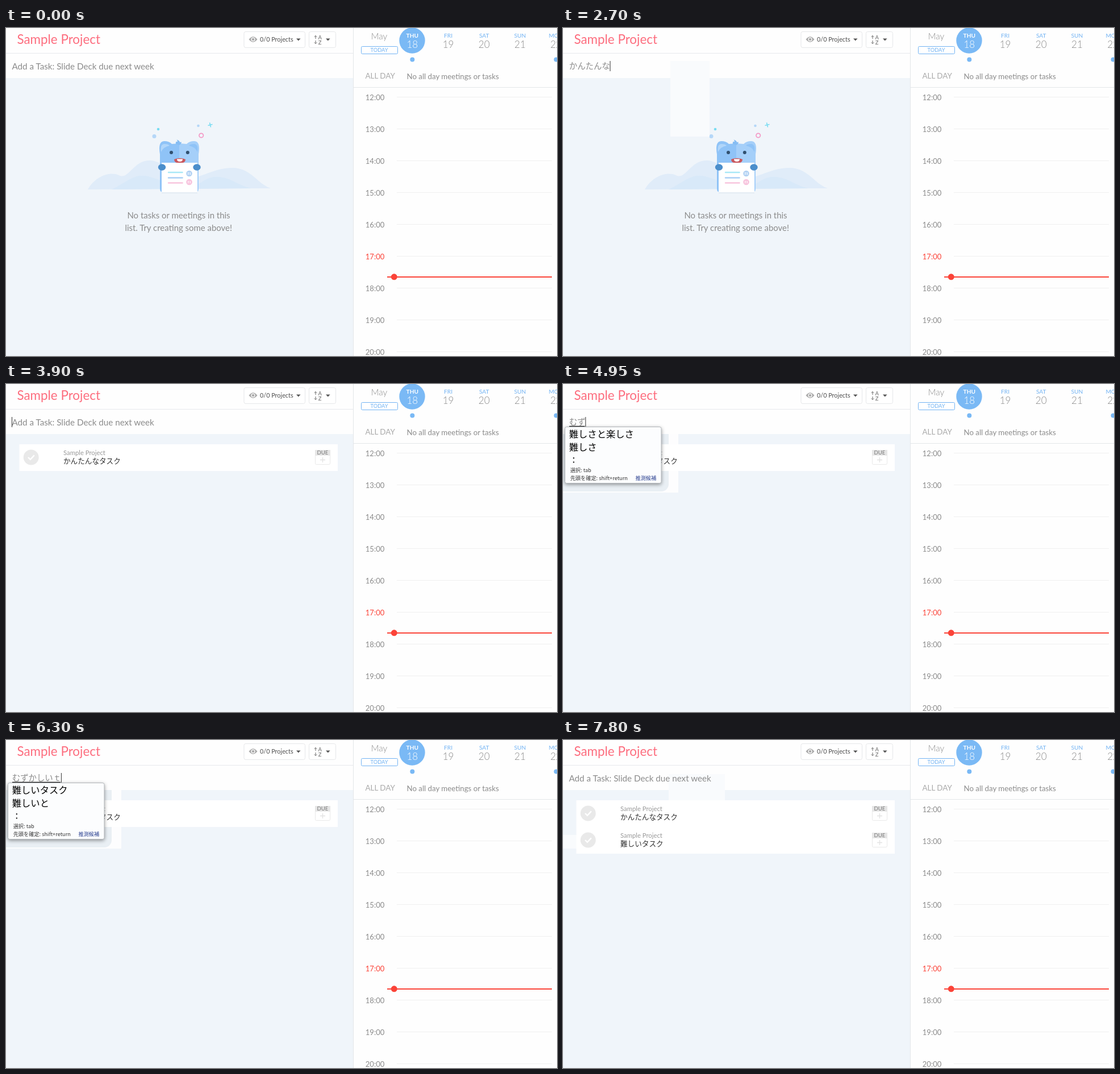
Animation, 970 px wide and 577 px high, one loop 8 s. Source, as an HTML page:

```html
<!DOCTYPE html>
<html lang="en">
<head>
<meta charset="utf-8">
<title>Task planner</title>
<style>
  html, body { margin: 0; width: 100%; height: 100%; overflow: hidden; background: #fefefe; }
  svg { display: block; width: 970px; height: 577px; }
  text { font-family: Lato, "Noto Sans CJK JP", "Noto Sans CJK", sans-serif; fill: #8b8b8b; white-space: pre; }
  .jp { font-family: "Noto Sans CJK JP", "Noto Sans CJK", sans-serif; }
  .mid { text-anchor: middle; }
  .title { font-size: 22.4px; fill: #fd6e7f; }
  .body { font-size: 15.2px; }
  .note { font-size: 14.95px; }
  .typed { font-size: 14.4px; }
  .btn { fill: #fff; stroke: #e6e7e9; }
  .day { font-size: 10.2px; fill: #72b3f3; }
  .date { font-size: 17px; font-weight: 300; fill: #888; }
  .hour { font-size: 13px; }
  .cand { font-size: 16.3px; fill: #000; }
  .hint { font-size: 9.2px; fill: #333; }
  .name { font-size: 12.6px; fill: #333; }
  .pop { filter: drop-shadow(0 2px 3px rgba(0, 0, 0, .4)); }
</style>
</head>
<body>
<svg viewBox="0 0 970 577">
  <defs>
    <clipPath id="below"><path d="M0 88H611V577H0z"/></clipPath>
    <g id="row">
      <path d="M23.5 106h560.5v47H23.5z" fill="#fff"/>
      <circle cx="44.2" cy="129" r="13.5" fill="#e9e9e9"/>
      <path d="M39 129l3.8 3.8 7-7.4" fill="none" stroke="#fff" stroke-width="2.4"/>
      <text x="101" y="125" font-size="11.3" style="fill:#999">Sample Project</text>
      <rect x="544.5" y="116.5" width="26" height="25" rx="2" fill="#fff" stroke="#e9e9e9"/>
      <path d="M544 116h27v10h-27z" fill="#e6e6e6"/>
      <text class="mid" x="557.3" y="124.4" font-size="9.5" style="fill:#777">DUE</text>
      <path d="M553 133.5h9M557.5 129v9" stroke="#e2e2e2" stroke-width="1.3"/>
    </g>
  </defs>

  <path d="M0 0H970V577H0z" fill="#fefefe"/>
  <path d="M0 88H611V577H0z" fill="#f0f5fa"/>
  <path d="M0 44.5H611" stroke="#e7e9ec"/>
  <text class="title" x="19.5" y="28">Sample Project</text>

  <rect class="btn" x="419" y="6.5" width="107.5" height="28" rx="3"/>
  <path d="M427.5 20q7.5-9.5 15 0q-7.5 9.5-15 0z" fill="#aaa"/>
  <circle cx="435" cy="20" r="2.9" fill="#aaa" stroke="#fff" stroke-width="1.3"/>
  <text x="447" y="24" font-size="10.8" font-weight="500" style="fill:#5c5c5c">0/0 Projects</text>
  <rect class="btn" x="533.5" y="6.5" width="47" height="28" rx="3"/>
  <path d="M511 18.5h7.6l-3.8 4zM563 18.5h7.6l-3.8 4z" fill="#555"/>
  <path d="M545 19v-5.5m-2.2 2.2l2.2-2.2 2.2 2.2M545 22v5.5m-2.2-2.2l2.2 2.2 2.2-2.2" fill="none" stroke="#666"/>
  <text x="549.5" y="19.7" font-size="9.5" style="fill:#666">A</text>
  <text x="549.8" y="28.5" font-size="9.5" style="fill:#666">Z</text>

  <g id="empty">
    <path d="M144 284C158 260 184 251 201 260C216 265 226 233 252 233C281 233 292 264 320 266C352 260 368 246 400 246C432 247 442 274 466 282z" fill="#e0ecf9"/>
    <path d="M186 284C212 272 226 255 250 261C270 266 285 274 305 283zM318 283C345 276 352 259 375 262C398 264 408 277 432 282z" fill="#d8e9f9"/>
    <g fill="#b5d7f8">
      <circle cx="261" cy="190.5" r="3.5"/>
      <circle cx="338.5" cy="172" r="2.3"/>
      <circle cx="268" cy="178" r="2.3" fill="#79dcf2"/>
    </g>
    <circle cx="343.7" cy="189" r="3.7" fill="none" stroke="#f497c5" stroke-width="1.7"/>
    <path d="M355.5 171.5l8-2M358.5 166.500l2 8" stroke="#79dcf2" stroke-width="1.6"/>
    <path d="M271 283V222Q267 199 279 199Q287 199 292 204L305 203V289H277Q271 289 271 283z" fill="#8fc3f7"/>
    <path d="M339 283V222Q343 199 331 199Q323 199 318 204L305 203V289H333Q339 289 339 283z" fill="#a5cff9"/>
    <path d="M273 218Q271 204 279 204Q286 204 288 207Q277 209 273 218z" fill="#b1d6fa"/>
    <path d="M337 218Q339 204 331 204Q324 204 322 207Q333 209 337 218z" fill="#8fc3f7"/>
    <path d="M299 204Q298 199 302 200Q302 198 300.5 196.5Q306 198 306 201Q308 200 309 201Q308 205 305 206z" fill="#86bdf3"/>
    <g fill="#31506f"><circle cx="291" cy="219" r="3"/><circle cx="319.8" cy="219" r="3"/></g>
    <path d="M296 231Q306 227 316 231Q316 238 306 238Q296 238 296 231z" fill="#c9575d"/>
    <path d="M301 230.5H311Q311 235 306 235Q301 235 301 230.5z" fill="#fff"/>
    <path d="M274 288h63v3h-63z" fill="#e3ebf3"/>
    <path d="M274 237h63v52h-63z" fill="#fff"/>
    <g stroke-width="2.5" stroke-linecap="round">
      <path d="M286 254h24.5" stroke="#a9e8f7"/>
      <path d="M286 263.5h24.5" stroke="#a9cff5"/>
      <path d="M286 272.5h24.5" stroke="#f8c5de"/>
    </g>
    <circle cx="322.5" cy="256" r="5.3" fill="#b3d2f3"/>
    <circle cx="322.5" cy="271" r="5.3" fill="#f7c3dd"/>
    <g class="mid" font-size="6" font-weight="700">
      <text x="322.5" y="258.2" style="fill:#fff">31</text>
      <text x="322.5" y="273.2" style="fill:#fff">31</text>
    </g>
    <g fill="#4b8ecb"><ellipse cx="274.5" cy="245" rx="6.7" ry="5.7"/><ellipse cx="336" cy="245" rx="6.7" ry="5.7"/></g>
    <text class="note mid" x="304" y="335">No tasks or meetings in this</text>
    <text class="note mid" x="303.7" y="357">list. Try creating some above!</text>
  </g>

  <path id="haze" fill="#f9fbfd"/>
  <rect id="halo" x="-14" y="66" height="123" rx="13" fill="#e9eff4" clip-path="url(#below)"/>
  <g id="task1"><use href="#row"/><text class="jp name" x="101" y="140.3">かんたんなタスク</text></g>
  <g id="task2" transform="translate(0 47)"><use href="#row"/><text class="jp name" x="101" y="140.3">難しいタスク</text></g>

  <text class="body" id="hintText" x="10.5" y="72.5">Add a Task: Slide Deck due next week</text>
  <text class="jp typed" id="typed" x="10.8" y="72"></text>
  <path id="line" stroke="#222" stroke-width="1.3"/>
  <path id="caret" stroke="#333"/>

  <g id="popup">
    <rect class="pop" id="frame" x="3.5" y="75.5" height="99" rx="3" fill="#fcfdfe" stroke="#b2b6ba"/>
    <text class="jp cand" id="first" x="10.8" y="93.7"></text>
    <text class="jp cand" id="second" x="10.8" y="117"></text>
    <path d="M17.8 129.3h2v2h-2zM17.8 136.5h2v2h-2z"/>
    <text class="jp hint" x="12.7" y="155.3">選択: tab</text>
    <text class="jp hint" x="12.7" y="169">先頭を確定: shift+return</text>
    <text class="jp hint" x="127.5" y="169" style="fill:#2b4191">推測候補</text>
  </g>

  <g id="calendar">
    <path d="M611.5 0V577M612 104.5H970" stroke="#e3e6e9"/>
    <text class="mid" x="657" y="20" font-size="15.3" font-weight="300">May</text>
    <rect x="625.5" y="32.5" width="64" height="13" rx="2" fill="#fff" stroke="#72b3f3"/>
    <text class="mid" x="657" y="42" font-size="9.3" style="fill:#72b3f3">TODAY</text>
    <g fill="#7ab9f5">
      <circle cx="715" cy="22" r="22.7"/>
      <circle cx="715.3" cy="55.5" r="4"/>
      <circle cx="968.5" cy="55.5" r="4"/>
    </g>
    <text x="632.5" y="88.8" font-size="13.4" style="fill:#aaa">ALL DAY</text>
    <text x="705.5" y="89.7" font-size="13.25">No all day meetings or tasks</text>
  </g>
  <g id="now" fill="#fb4338">
    <path d="M671 437H961V439H671z"/>
    <circle cx="683.3" cy="437.8" r="5.5"/>
  </g>
</svg>
<script>
const $ = id => document.getElementById(id);
const show = (id, on) => $(id).setAttribute('display', on ? 'inline' : 'none');
const set = (id, name, value) => $(id).setAttribute(name, value);
const box = (l, t, r, b) => `M${l} ${t}H${r}V${b}H${l}z`;

function add(parent, tag, attrs, text = '') {
  const el = document.createElementNS('http://www.w3.org/2000/svg', tag);
  for (const key in attrs) el.setAttribute(key, attrs[key]);
  el.textContent = text;
  $(parent).append(el);
}

['THU', 'FRI', 'SAT', 'SUN', 'MON'].forEach((day, i) => {
  const x = 715.3 + 63.2 * i, style = i ? '' : 'fill:#fff;';
  add('calendar', 'text', { class: 'day mid', x, y: 16.5, style: style + (i ? '' : 'font-weight:700') }, day);
  add('calendar', 'text', { class: 'date mid', x, y: 34.5, style }, 18 + i);
});
for (let i = 0; i < 9; i++) {
  const y = 121.5 + 56 * i;
  add('calendar', 'path', { d: `M688 ${y}H961`, stroke: '#f0f0f0' });
  add('calendar', 'text', { class: 'hour', x: 632.8, y: y + 5, style: i === 5 ? 'fill:#fb4338' : '' }, `${12 + i}:00`);
}

// Each step: start, typed text, candidates, popup right edge
const kan = ['環境改善委員会', '神名瀬透'];
const easy = ['かんたんな', '簡単な'];
const task = ['タスク', 'タスクの'];
const hard = ['難しい', '難しいと'];
const hardTask = ['難しいタスク', '難しいと'];
const steps = [
  [0, ''],
  [1200, 'ｋ', ['環境', '今日']],
  [1650, 'かｎ', kan],
  [1800, 'かんｔ', ['簡単', '感嘆']],
  [1950, 'かんた', ['簡単', '感嘆']],
  [2100, 'かんたｎ', ['簡単', '簡単な']],
  [2250, 'かんたんな', easy],
  [2700, 'かんたんな'],
  [2850, 'かんたんなｔ', ['と', 'ところ']],
  [3000, 'かんたんなた', ['ために', 'タスク']],
  [3150, 'かんたんなたｓ', task],
  [3300, 'かんたんなたすｋ', task],
  [3450, 'かんたんなタスク'],
  [3600, ''],
  [4200, 'ｍ', ['また', 'もう']],
  [4350, 'む', ['無理', '難しい']],
  [4800, 'むｚ', ['難しさを乗り越える', '難しい'], 189],
  [4950, 'むず', ['難しさと楽しさ', '難しさ']],
  [5250, 'むずか', ['難しさを乗り越える', '難しい'], 189],
  [5550, 'むずかｓ', hard],
  [5700, 'むずかし', hard],
  [5850, 'むずかしｉ', ['難しいことを簡単に考える方法', '難しい'], 264],
  [6000, 'むずかしい', hard],
  [6300, 'むずかしいｔ', hardTask],
  [6450, 'むずかしいた', hardTask],
  [6600, 'むずかしいたｓ', hardTask],
  [6750, 'むずかしいたす', hardTask],
  [6900, 'むずかしいたすｋ', hardTask],
  [7050, '難しいタスク'],
  [7350, '']
];

// Pale patches left behind by the popup
const hazes = [
  [0, ''],
  [1200, box(125, 58, 258, 191)],
  [2700, box(189, 58, 258, 191)],
  [3600, ''],
  [4200, box(0, 88, 203, 191)],
  [7050, box(186, 60, 285, 152) + box(0, 167, 24, 191)]
];

const at = (list, t) => list.filter(step => step[0] <= t).pop();
const within = (t, a, b) => t >= a && t < b;

function draw(t) {
  const [, text, words, right = 173] = at(steps, t);
  const end = 11 + 14.4 * text.length;
  const idle = !text;
  const blink = within(t, 450, 900) || within(t, 3600, 4200) || within(t, 7350, 7800);

  show('empty', t < 3900);
  show('task1', t >= 3900);
  show('task2', t >= 7500);
  show('hintText', idle);
  $('typed').textContent = text;
  set('caret', 'd', `M${idle ? 10.5 : end} 58V76`);
  show('caret', !idle || blink);
  show('line', !!words);
  show('popup', !!words);
  show('halo', !!words);
  set('haze', 'd', at(hazes, t)[1]);
  set('haze', 'fill', within(t, 4200, 7050) ? '#fdfdfe' : '#f9fbfd');
  if (words) {
    set('line', 'd', `M11 74.5H${end - 1.5}`);
    set('frame', 'width', right - 3.5);
    set('halo', 'width', right + 27);
    $('first').textContent = words[0];
    $('second').textContent = words[1];
  }
}

function tick() {
  draw(performance.now() % 8000);
  requestAnimationFrame(tick);
}
tick();
</script>
</body>
</html>
```
